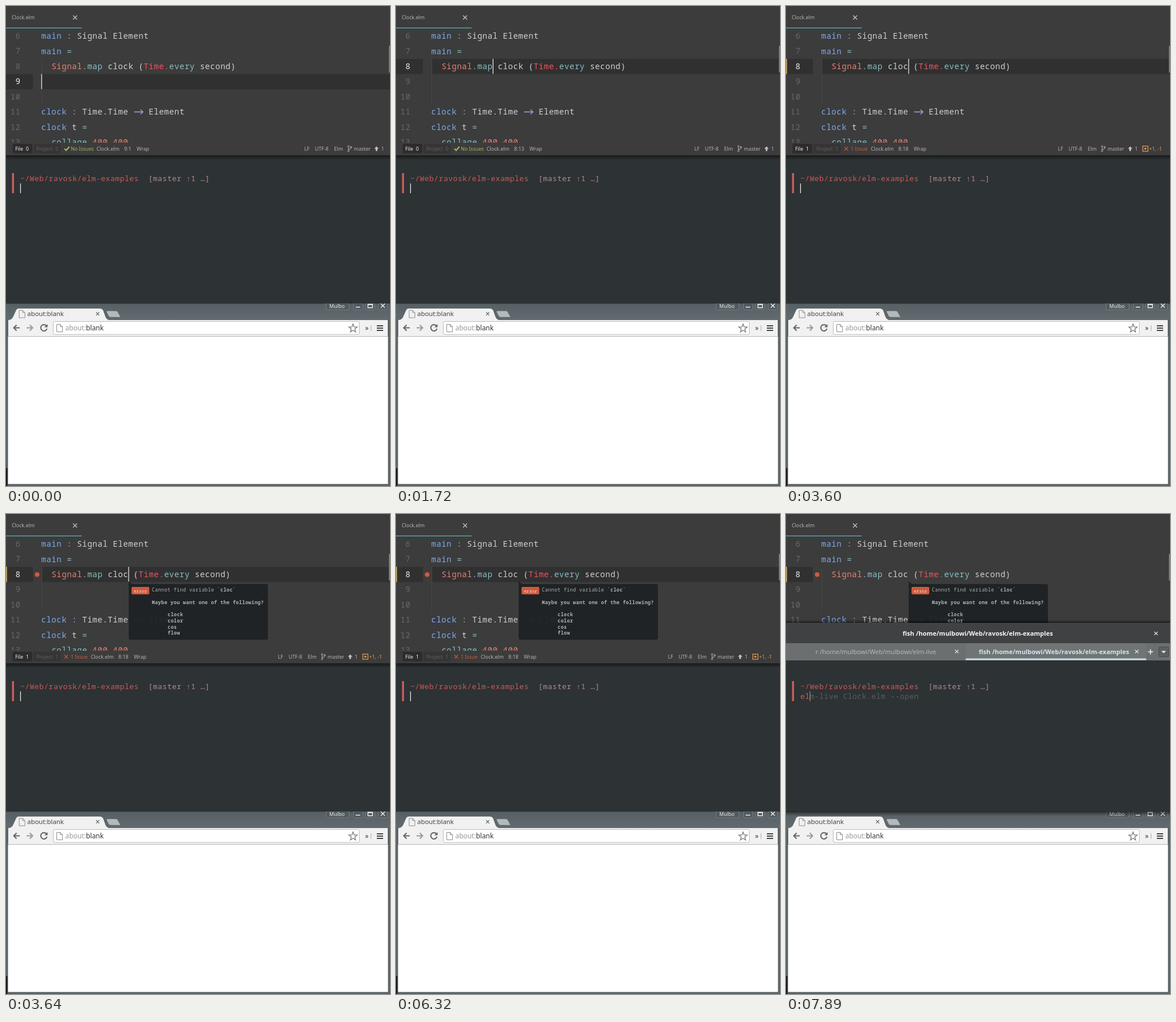
Recreate the animation shown at these times as an HTML page. Size 670 by 836 pixels, loop 8 s.

```html
<!DOCTYPE html>
<html lang="en">
<head>
<meta charset="utf-8">
<title>Editor, terminal and browser</title>
<style>
  html, body { margin: 0; width: 100%; height: 100%; overflow: hidden; background: #2d3234; }
  svg { display: block; width: 670px; height: 836px; font-family: "Noto Sans", "Open Sans", sans-serif; }
  text { white-space: pre; }
  .code, .shell, .lint { font-family: "Noto Sans Mono", "DejaVu Sans Mono", monospace; }
  .code { font-size: 14px; letter-spacing: .53px; fill: #cdd0d2; }
  .shell { font-size: 13px; letter-spacing: .47px; fill: #cb5a56; }
  .lint { font-size: 8.5px; letter-spacing: .33px; fill: #aeb1b3; }
  .small { font-size: 8.8px; fill: #b4b4b4; }
  .head { font-size: 11px; }
  .bold { font-weight: bold; }
  .number { text-anchor: end; fill: #686868; }
  .number.on { fill: #f0f0f0; }
  .blue { fill: #7eaaea; }
  .teal { fill: #87bfc3; }
  .violet { fill: #a9a3dd; }
  .salmon { fill: #e98072; }
  .pink { fill: #f0505f; }
  .line { fill: none; stroke-width: 1.3; }
</style>
</head>
<body>
<svg viewBox="0 0 670 836">
  <defs>
    <linearGradient id="shade" x2="0" y2="1">
      <stop stop-color="#000" stop-opacity=".5"/>
      <stop offset="1" stop-color="#000" stop-opacity="0"/>
    </linearGradient>
    <linearGradient id="frame" x2="0" y2="1">
      <stop stop-color="#566064"/>
      <stop offset="1" stop-color="#616b6f"/>
    </linearGradient>
    <clipPath id="codeArea"><rect y="40" width="670" height="198"/></clipPath>
    <path id="cross" class="line" d="M-3.5-3.5L3.5 3.5M3.5-3.5L-3.5 3.5"/>
    <path id="page" class="line" d="M0 0H6L10 4V13H0ZM6 0V4H10" style="stroke-width:1"/>
  </defs>

  <g id="browser">
    <rect y="518" width="670" height="318" fill="#5a6468"/>
    <rect y="518" width="670" height="28" fill="url(#frame)"/>
    <rect y="518" width="670" height="1" fill="#41494c"/>
    <rect y="805" width="2.5" height="31" fill="#17191a"/>
    <rect x="3" y="546" width="664" height="287" fill="#525b5e"/>
    <rect x="3.500" y="576" width="663" height="256.500" fill="#fff"/>
    <path d="M3.500 546.500Q10 546.500 12 541.500L17 530.500Q18.500 526.500 22 526.500H164Q168 526.500 170 530.500L174 541.500Q176 546.500 181 546.500H666.500V575.500H3.500Z" fill="#f1f1f1" stroke="#4b5457" stroke-width=".7"/>
    <rect x="3.500" y="575" width="663" height="1" fill="#b4b6b6"/>
    <path d="M177 531H192Q194 531 195 533L200 542H183Q180 542 179 540L175 532Z" fill="#b3babb" stroke="#525c5f" stroke-width=".5"/>
    <use href="#page" x="23" y="530" stroke="#8b8b8b" fill="#fff"/>
    <text x="37" y="540" font-size="11.4" fill="#444">about:blank</text>
    <use href="#cross" transform="translate(160 536) scale(.8)" stroke="#555" style="stroke-width:1.8"/>
    <g stroke="#656565" stroke-width="2" fill="none">
      <path d="M24 560.500H13.500M18.500 555.500L13.500 560.500L18.500 565.500"/>
      <path d="M36 560.500H46.500M41.500 555.500L46.500 560.500L41.500 565.500" stroke="#9a9a9a"/>
      <path d="M70.500 557A5.500 5.500 0 1 0 71.500 562"/>
      <path d="M72.500 554V559.500H67Z" fill="#656565" stroke="none"/>
    </g>
    <rect x="82.500" y="549.500" width="534" height="22.500" rx="2" fill="#fff" stroke="#bcbcbc"/>
    <use href="#page" x="88.500" y="554.500" stroke="#8b8b8b"/>
    <text x="103.500" y="565" font-size="11.9" fill="#999">about:<tspan fill="#333">blank</tspan></text>
    <path id="star" class="line" stroke="#777"/>
    <text x="626.500" y="565" font-size="12" fill="#333">»</text>
    <rect x="636.500" y="556" width="1" height="10" fill="#aaa"/>
    <path d="M647 557H658M647 561H658M647 565H658" stroke="#444" stroke-width="2"/>
    <g fill="#515b5f" stroke="#727d81">
      <rect x="558.500" y="513" width="40" height="16" rx="2"/>
      <rect x="606.500" y="513" width="16" height="16" rx="2"/>
      <rect x="627.500" y="513" width="16" height="16" rx="2"/>
      <rect x="649.500" y="513" width="16" height="16" rx="2"/>
    </g>
    <text x="564" y="526" font-size="9" fill="#e4e7e8">Mulbo</text>
    <g stroke="#f2f4f4" fill="none" stroke-width="1.4">
      <path d="M610 524.500H618"/>
      <path d="M631.500 519.500H639.500V525.500H631.500ZM631 520H640"/>
      <use href="#cross" x="657.500" y="522"/>
    </g>
    <rect id="terminalShade" y="518" width="670" height="8" fill="url(#shade)"/>
  </g>

  <g id="terminal">
    <rect y="255" width="670" height="263" fill="#2d3234"/>
    <rect x="10.500" y="291" width="3.500" height="35" fill="#cd5b57"/>
    <text class="shell" x="25" y="304.500">~/Web/ravosk/elm-examples  <tspan fill="#b18a8b">[master ↑1 …]</tspan></text>
    <text class="shell" x="25" y="322"><tspan id="typed"></tspan><tspan id="hint" fill="#595e5f"></tspan></text>
    <rect id="shellCaret" y="309" width="1.200" height="17" fill="#f2f2f2"/>
  </g>

  <g id="editor">
    <rect id="editorShade" y="260" width="670" height="8" fill="url(#shade)"/>
    <rect width="670" height="260" fill="#3c3c3c"/>
    <text class="small" x="10" y="22.500">Clock.elm</text>
    <use id="tabClose" href="#cross" x="120.500" y="20" stroke="#c4c4c4"/>
    <circle id="tabDot" cx="120.500" cy="20.500" r="3.500" fill="#7eaaea"/>
    <rect y="37.500" width="132" height="1.500" fill="#5b9da5"/>
    <g clip-path="url(#codeArea)">
      <g id="highlight" fill="#303030">
        <rect width="47" height="26.500"/>
        <rect id="rowBand" x="62" width="608" height="26.500"/>
      </g>
      <rect x="62" y="92" width="1" height="79" fill="#474747"/>
      <g id="numbers"></g>
      <g class="code">
        <text x="61.500" y="57"><tspan class="blue">main</tspan> <tspan class="violet">:</tspan> Signal Element</text>
        <text x="61.500" y="83.500"><tspan class="blue">main</tspan> <tspan class="teal">=</tspan></text>
        <text x="79.400" y="110"><tspan class="salmon">Signal</tspan><tspan class="teal">.map</tspan> <tspan id="word"></tspan> (<tspan class="pink">Time.</tspan><tspan class="teal">every</tspan> second)</text>
        <text x="61.500" y="189.300"><tspan class="blue">clock</tspan> <tspan class="violet">:</tspan> Time.Time    Element</text>
        <path class="line" d="M223.500 184.500H239M234.500 180.500L239 184.500L234.500 188.500" stroke="#a9a3dd"/>
        <text x="61.500" y="215.700"><tspan class="blue">clock</tspan> t <tspan class="teal">=</tspan></text>
        <text x="79.400" y="242.200"><tspan class="teal">collage</tspan> <tspan class="salmon">400 400</tspan></text>
      </g>
      <rect id="caret" width="1.200" height="26" fill="#f4f4f4"/>
      <rect id="changeBar" y="92" width="1.800" height="26.500" fill="#c8a260"/>
    </g>
    <rect x="668" y="69" width="2" height="47" rx="1" fill="#7c7c7c"/>

    <rect x="11.500" y="240" width="34.500" height="16.500" rx="2" fill="#2c2c2c"/>
    <rect x="48" y="240" width="47" height="16.500" rx="2" fill="#353535"/>
    <text id="fileCount" class="small" x="16" y="251.500" style="fill:#f0f0f0"></text>
    <text id="projectCount" class="small" x="53" y="251.500" style="fill:#606060"></text>
    <path id="okIcon" d="M102 248.500L105 251.500L110.500 245" fill="none" stroke="#a6b75c" stroke-width="2.200"/>
    <use id="badIcon" href="#cross" transform="translate(105 248.500) scale(.9)" style="stroke:#d4573c;stroke-width:2.800"/>
    <text id="issues" class="small" x="113" y="251.500"></text>
    <text id="fileName" class="small" y="251.500"></text>
    <text id="position" class="small" y="251.500"></text>
    <text id="wrap" class="small" y="251.500">Wrap</text>
    <g id="gitStatus">
      <g class="small">
        <text x="520.500" y="251.500">LF</text>
        <text x="539" y="251.500">UTF-8</text>
        <text x="572.500" y="251.500">Elm</text>
        <text x="607" y="251.500">master</text>
        <text x="654.500" y="251.500">1</text>
      </g>
      <g fill="none" stroke="#b4b4b4">
        <circle cx="597.500" cy="244.500" r="1.300"/>
        <circle cx="597.500" cy="252.500" r="1.300"/>
        <circle cx="602" cy="246" r="1.300"/>
        <path d="M597.500 246V251M602 247.500Q602 249.500 597.500 250"/>
      </g>
      <path d="M646.500 244.500L650.500 248.700H648V252.500H645V248.700H642.500Z" fill="#c0c0c0"/>
    </g>
    <g id="diff">
      <rect x="622.500" y="244" width="9" height="9" class="line" stroke="#dc9a50"/>
      <circle cx="627" cy="248.500" r="1.800" fill="#dc9a50"/>
      <text class="small" x="633.500" y="251.500" style="fill:#dc9a50">+1, -1</text>
    </g>

    <g id="problem">
      <circle cx="54.300" cy="105.500" r="4" fill="#d4573c"/>
      <path d="M214 117L220 122H454Q457 122 457 125V216Q457 219 454 219H217Q214 219 214 216Z" fill="#1f2325" fill-opacity=".96"/>
      <rect x="219" y="127" width="31" height="13" rx="2" fill="#d0583b"/>
      <text class="lint" x="223" y="136.500" style="font-size:7.700px;letter-spacing:0;fill:#f3e6e2">error</text>
      <text class="lint" x="254.500" y="135">Cannot find variable `<tspan class="bold">cloc</tspan>`</text>
      <g class="bold">
        <text class="lint" x="254.500" y="156.500">Maybe you want one of the following?</text>
        <text class="lint" x="282" y="178">clock</text>
        <text class="lint" x="282" y="188.700">color</text>
        <text class="lint" x="282" y="199.500">cos</text>
        <text class="lint" x="282" y="210.300">flow</text>
      </g>
    </g>
  </g>

  <g id="terminalHead">
    <rect y="184" width="670" height="6" fill="url(#shade)" transform="matrix(1 0 0 -1 0 374)"/>
    <rect y="190" width="670" height="35" fill="#3f4143"/>
    <rect y="190" width="670" height="1" fill="#4d4f50"/>
    <rect y="225" width="670" height="30" fill="#6c6f70"/>
    <rect x="313.500" y="225" width="315" height="30" fill="#717475"/>
    <rect x="313.500" y="251.500" width="315" height="3" fill="#c3dfe9"/>
    <g id="titleBar">
      <text class="head bold" x="203.500" y="212" stroke="none">fish /home/mulbowi/Web/ravosk/elm-examples</text>
      <use href="#cross" transform="translate(645.500 208) scale(.85)" style="stroke-width:2"/>
    </g>
    <text class="head" x="51.500" y="243.500" fill="#b5b9b9">r /home/mulbowi/Web/mulbowi/elm-live</text>
    <text class="head bold" x="336.500" y="243.500" fill="#d3e6ec">fish /home/mulbowi/Web/ravosk/elm-examples</text>
    <g stroke="#eef1f1">
      <use href="#cross" transform="translate(298 239.500) scale(.85)"/>
      <use href="#cross" transform="translate(612 239.500) scale(.85)"/>
      <path d="M631.500 240H640.500M636 235.500V244.500" stroke-width="1.600"/>
    </g>
    <rect x="650.500" y="231.500" width="17" height="17" rx="2" fill="#5d6061" stroke="#45484a"/>
    <path d="M655 238.500H663L659 242.500Z" fill="#eef1f1"/>
  </g>
</svg>
<script>
const LOOP = 8000, CHAR = 8.93, ROW = 26.45;
const COMMAND = 'elm-live Clock.elm --open';
const el = id => document.getElementById(id);
const show = (id, on) => el(id).style.display = on ? '' : 'none';
const write = (id, text) => el(id).textContent = text;
const move = (id, x) => el(id).setAttribute('x', x);

// Each step changes only the listed parts of the state.
const steps = [
  [0, { line: 9, col: 1, caret: true, position: '9:1', word: 'clock', shellCaret: true, typed: 0 }],
  [490, { caret: false }],
  [840, { caret: true }],
  [1050, { line: 8 }],
  [1090, { position: '8:1' }],
  [1370, { col: 9, position: '8:9' }],
  [1530, { col: 10, position: '8:10' }],
  [1720, { col: 13, position: '8:13' }],
  [2000, { col: 19 }],
  [2040, { position: '8:19' }],
  [2510, { caret: false }],
  [2740, { caret: true, col: 18, position: '8:18', word: 'cloc' }],
  [2920, { changed: true }],
  [2970, { unsaved: true }],
  [3150, { unsaved: false }],
  [3230, { diff: true }],
  [3510, { issue: true }],
  [3640, { problem: true }],
  [3950, { caret: false }],
  [4300, { caret: true }],
  [4700, { caret: false }],
  [5070, { caret: true }],
  [5500, { caret: false }],
  [5880, { caret: true }],
  [6320, { caret: false }],
  [6430, { terminal: true }],
  [6470, { focused: true }],
  [7040, { shellCaret: false }],
  [7630, { shellCaret: true }],
  [7770, { typed: 1 }],
  [7890, { typed: 2 }]
];

for (let n = 6; n <= 13; n++) {
  const label = document.createElementNS('http://www.w3.org/2000/svg', 'text');
  label.setAttribute('x', 25.5);
  label.setAttribute('y', 57 + (n - 6) * ROW);
  label.id = 'number' + n;
  label.textContent = n;
  el('numbers').append(label);
}

const starPoints = Array.from({ length: 10 }, (_, i) => {
  const r = i % 2 ? 3.2 : 7.7, a = i * Math.PI / 5;
  return [605.5 + r * Math.sin(a), 561.5 - r * Math.cos(a)];
});
el('star').setAttribute('d', 'M' + starPoints.join('L') + 'Z');

function drawStatus(s) {
  const left = s.issue ? 148 : 158;
  const positionX = left + 48 + (s.unsaved ? 5 : 0);
  write('fileCount', 'File  ' + (s.issue ? 1 : 0));
  write('projectCount', 'Project  ' + (s.issue ? 1 : 0));
  write('issues', s.issue ? '1 Issue' : 'No Issues');
  el('issues').style.fill = s.issue ? '#d4573c' : '#a6b75c';
  write('fileName', 'Clock.elm' + (s.unsaved ? '*' : ''));
  write('position', s.position);
  move('fileName', left);
  move('position', positionX);
  move('wrap', positionX + (s.position.length > 3 ? 27 : 22));
  show('okIcon', !s.issue);
  show('badIcon', s.issue);
  show('diff', s.diff);
  el('gitStatus').setAttribute('transform', `translate(${s.diff ? -46 : 0})`);
}

function draw(time) {
  const s = Object.assign({}, ...steps.filter(([at]) => time >= at).map(step => step[1]));
  const rowTop = 39.2 + (s.line - 6) * ROW;
  for (let n = 6; n <= 13; n++) {
    el('number' + n).setAttribute('class', 'code number' + (n === s.line ? ' on' : ''));
  }
  el('highlight').setAttribute('transform', `translate(0 ${rowTop})`);
  move('caret', 61.6 + (s.col - 1) * CHAR);
  el('caret').setAttribute('y', rowTop);
  write('word', s.word);
  show('caret', s.caret);
  show('rowBand', !s.terminal);
  show('changeBar', s.changed);
  show('tabDot', s.unsaved);
  show('tabClose', !s.unsaved);
  show('problem', s.problem);
  drawStatus(s);

  show('terminalHead', s.terminal);
  show('terminalShade', s.terminal);
  show('editorShade', !s.terminal);
  // The terminal body is lifted above the editor when its window is raised.
  el('terminalHead').before(...(s.terminal ? [el('editor'), el('terminal')] : [el('terminal'), el('editor')]));
  const titleColor = s.focused ? '#f4f6f6' : '#d0d3d4';
  el('titleBar').style.fill = el('titleBar').style.stroke = titleColor;
  write('typed', COMMAND.slice(0, s.typed));
  write('hint', s.typed ? COMMAND.slice(s.typed) : '');
  move('shellCaret', 24.8 + s.typed * 8.27);
  el('shellCaret').style.opacity = s.typed ? .5 : 1;
  show('shellCaret', s.shellCaret);
}

function tick() {
  draw(performance.now() % LOOP);
  requestAnimationFrame(tick);
}
tick();
</script>
</body>
</html>
```
